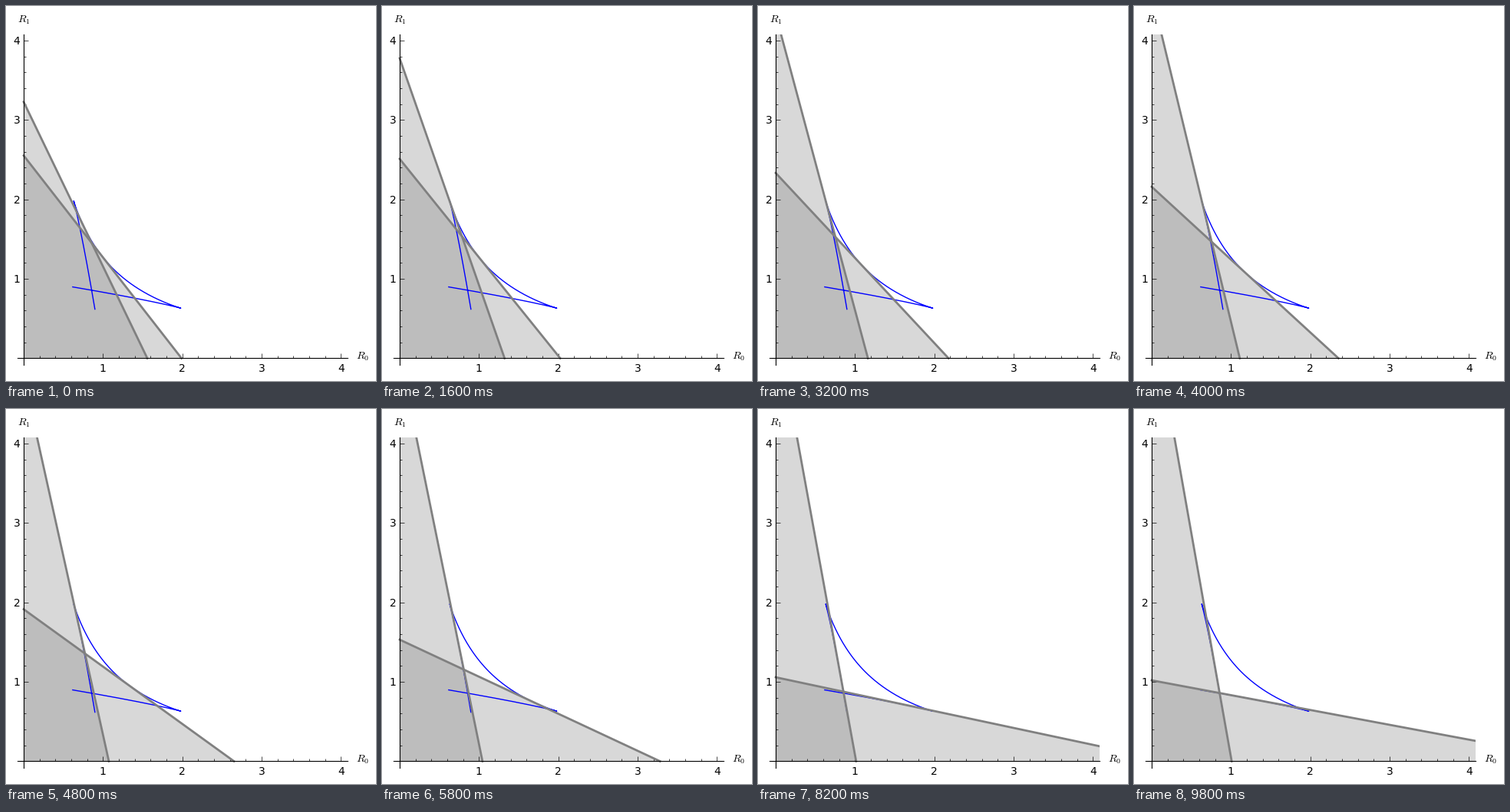
Write a matplotlib script that moves like this. It is 482 by 488 pixels and loops after 10000 ms.

```python
import numpy as np
import matplotlib.pyplot as plt
from matplotlib.animation import FuncAnimation

W, H, DPI = 482, 488, 100
FRAMES, INTERVAL = 50, 200
SIZE = 430                      # axes side in pixels
LEFT, TOP = 14.75, 36.67
STEP = SIZE / 4.16              # pixels per unit
X0, Y0 = LEFT + 0.08 * STEP, TOP + 4.08 * STEP
GRAY = "0.5"

plt.rcParams["font.family"] = "DejaVu Sans"
plt.rcParams["mathtext.fontset"] = "cm"


def log_product(w):
    return -1.626 + 0.0215 * w**2 - 0.004 * np.abs(w) ** 7


def coefficients(w):
    """Line u*R0 + v*R1 = 1 whose log slope is w."""
    g = log_product(w)
    return np.exp((g + w) / 2), np.exp((g - w) / 2)


def envelope(w):
    """Curve touched by every line of the family."""
    u, v = coefficients(w)
    slope = 0.043 * w - 0.028 * np.sign(w) * np.abs(w) ** 6
    return (1 - slope) / (2 * u), (1 + slope) / (2 * v)


def steep_param(i):
    return 1.757 * np.tanh((0.882 + 0.058 * i + 0.0005 * i**2) / 2)


def flat_param(i):
    s = np.interp(i, [0, 8, 16, 24, 33, 41, 49],
                  [-5.19, -3.77, -2.235, -0.867, 0.811, 2.352, 3.83])
    return 0.26 - 1.98 / (1 + np.exp(-s))


fig = plt.figure(figsize=(W / DPI, H / DPI), dpi=DPI, facecolor="white")
ax = fig.add_axes([LEFT / W, 1 - (TOP + SIZE) / H, SIZE / W, SIZE / H])
ax.set(xlim=(-0.08, 4.08), ylim=(-0.08, 4.08))
ax.patch.set_visible(False)

for side in ("top", "right"):
    ax.spines[side].set_visible(False)
for side in ("left", "bottom"):
    ax.spines[side].set_position("zero")
    ax.spines[side].set_linewidth(0.8)
for axis in (ax.xaxis, ax.yaxis):
    axis.set_ticks(range(1, 5), labels=[""] * 4)
    axis.set_ticks(np.arange(1, 21) * 0.2, minor=True)
ax.tick_params(which="major", direction="in", length=4, width=0.5)
ax.tick_params(which="minor", direction="in", length=2, width=0.5)


def label(x, y, text, ha="left"):
    fig.text(x / W, 1 - y / H, text, ha=ha, va="baseline", fontsize=10)


for n in range(1, 5):
    label(X0 + n * STEP - 0.07, 476, str(n), "center")
    label(18.3, Y0 - n * STEP + 5, str(n), "right")
label(456, 460, "$R_0$")
label(15, 21.5, "$R_1$")

ax.plot(*envelope(np.linspace(-1.772, 1.772, 600)), color="blue", lw=1, zorder=2)

areas, edges = [], []
for _ in range(2):
    areas += ax.fill([0, 0, 0], [0, 0, 0], color=GRAY, alpha=0.3, lw=0, zorder=1)
    edges += ax.plot([], [], color=GRAY, lw=2, zorder=2.2)


def draw(i):
    for w, area, edge in zip((steep_param(i), flat_param(i)), areas, edges):
        u, v = coefficients(w)
        area.set_xy([(0, 0), (1 / u, 0), (0, 1 / v)])
        edge.set_data([0, 1 / u], [1 / v, 0])
    return areas + edges


anim = FuncAnimation(fig, draw, frames=FRAMES, interval=INTERVAL,
                     init_func=lambda: draw(0), repeat=True, repeat_delay=0)
plt.show()
```
